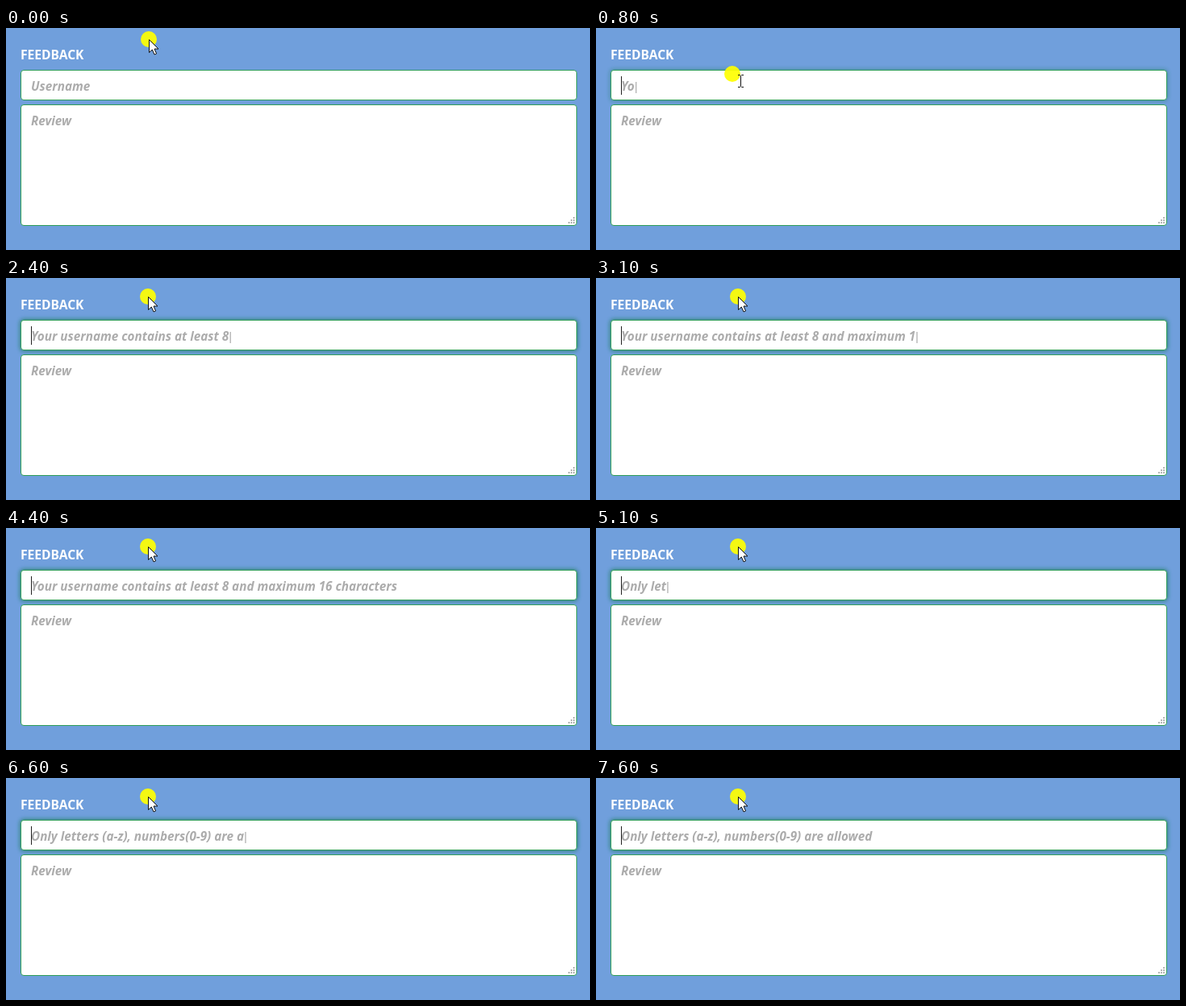
An HTML page that plays this animation: 724 px wide and 276 px high, repeating every 8000 ms.

```html
<!DOCTYPE html>
<html lang="en">
<head>
<meta charset="utf-8">
<title>Feedback form</title>
<style>
html, body { margin: 0; width: 100%; height: 100%; overflow: hidden; background: #709fdc; }
svg { display: block; }
text { font: bold 15.25px "Open Sans", "Noto Sans", sans-serif; white-space: pre; }
.hint { font-style: italic; fill: #acacac; }
.bar { font: 15px "Liberation Sans", sans-serif; }
.field { fill: #fff; stroke: #2f9e58; }
</style>
</head>
<body>
<svg width="724" height="276" viewBox="0 0 724 276">
  <defs>
    <filter id="blur" filterUnits="userSpaceOnUse" x="0" y="35" width="724" height="72">
      <feGaussianBlur stdDeviation="2.5"/>
    </filter>
  </defs>
  <text x="18" y="39" fill="#fff" style="font-size:15.6px">FEEDBACK</text>
  <rect id="glow" x="17" y="51" width="692" height="40" rx="5" fill="#1f7a5c" filter="url(#blur)"/>
  <rect class="field" x="18.5" y="52.5" width="689" height="37" rx="3.5"/>
  <rect class="field" x="18.5" y="95.5" width="689" height="150" rx="3.5"/>
  <text class="hint" x="31" y="78"><tspan id="typed"></tspan><tspan id="bar" class="bar">|</tspan></text>
  <text class="hint" x="31" y="121">Review</text>
  <path id="caret" d="M31.5 60V83" stroke="#222"/>
  <path d="M703 236h2M700 239h2m1 0h2M697 242h2m1 0h2m1 0h2" stroke="#b4b4b4" stroke-width="2"/>
  <g id="mouse">
    <circle r="10" fill="#ff0" fill-opacity=".92"/>
    <path id="arrow" d="M.5 .5V16.5L4.3 13L7 19L9.6 17.9L7 12H12Z" fill="#fff" stroke="#111"/>
    <path id="beam" d="M7 1.5h2.5l1 1l1-1H14M10.5 2.5V15.5M7 16.5h2.5l1-1l1 1H14" fill="none" stroke="#111"/>
  </g>
</svg>
<script>
const LOOP = 8000, FOCUS = 676;
const lines = [
  { text: "Your username contains at least 8 and maximum 16 characters", start: FOCUS, step: 51.5 },
  { text: "Only letters (a-z), numbers(0-9) are allowed", start: 4655, step: 51 }
];
const caretOff = [[3900, 4400], [7100, 7600]];
// time, x, y
const path = [[50, 177, 14], [550, 169, 57], [880, 169, 57], [1400, 176, 23]];

const el = id => document.getElementById(id);
const show = (id, on) => el(id).setAttribute("visibility", on ? "visible" : "hidden");
const clamp = v => Math.min(1, Math.max(0, v));
const ease = v => v * v * (3 - 2 * v);

function mouseAt(t) {
  let [, x, y] = path[0];
  for (let i = 1; i < path.length; i++) {
    const a = path[i - 1], b = path[i];
    const k = ease(clamp((t - a[0]) / (b[0] - a[0])));
    x += (b[1] - a[1]) * k;
    y += (b[2] - a[2]) * k;
  }
  return [x, y];
}

function draw(t) {
  const line = lines.filter(l => t >= l.start).pop();
  const count = line ? Math.floor((t - line.start) / line.step) : 0;
  el("typed").textContent = line ? line.text.slice(0, count) : "Username";
  show("bar", line && count < line.text.length);
  show("caret", t >= FOCUS && !caretOff.some(([a, b]) => t >= a && t < b));
  el("glow").setAttribute("opacity", 0.75 * ease(clamp((t - FOCUS) / 220)));

  const [x, y] = mouseAt(t);
  const inside = y > 52;
  el("mouse").setAttribute("transform", `translate(${Math.round(x)} ${Math.round(y)})`);
  show("arrow", !inside);
  show("beam", inside);
}

const begin = performance.now();
function tick() {
  draw((performance.now() - begin) % LOOP);
  requestAnimationFrame(tick);
}
draw(0);
requestAnimationFrame(tick);
</script>
</body>
</html>
```
